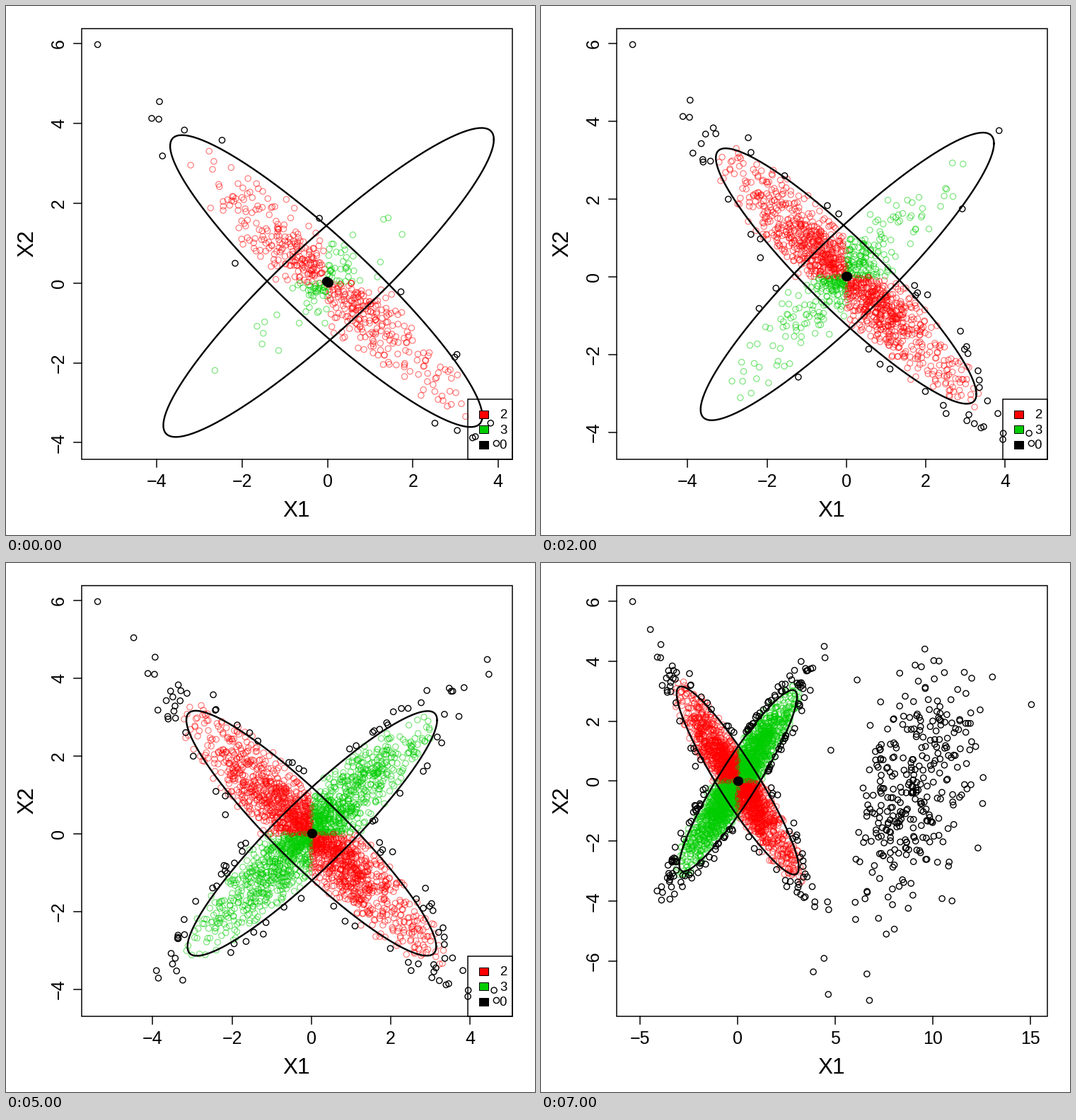
Animation of 748 by 748 pixels, one loop 8 s. Source, as a matplotlib script:

```python
import numpy as np
import matplotlib.pyplot as plt
from matplotlib.animation import FuncAnimation
from matplotlib.patches import Rectangle

SIZE, DPI = 748, 100
PX = 72 / DPI                      # points per pixel
LEFT, RIGHT, TOP, BOTTOM = 107, 716, 32, 641
RED, GREEN, BLACK = "#ff0000", "#00cd00", "#000000"
STEPS = 8
R = 0.925                          # correlation of both clusters

plt.rcParams["font.family"] = "Liberation Sans"
rng = np.random.default_rng(12)


def half_falling(t):
    return 3.125 + 0.535 * np.exp(-0.6 * t)


def half_rising(t):
    return 3.02 + 0.855 * (1 + np.cos(np.pi * min(t / 6.7, 1))) / 2


def mid_falling(t):
    fade = np.exp(-0.9 * t)
    return -0.03 * fade, 0.02 + 0.03 * fade


def mid_rising(t):
    return 0.025, 0.015


def count_falling(t):
    return int(np.interp(t, [0, 3, 7], [520, 1500, 1560]))


def count_rising(t):
    return min(28 + 45 * t * t, 1850)


def normal_pairs(n, sigma, r):
    z = rng.normal(size=(n, 2))
    return z, sigma * np.c_[z[:, 0], r * z[:, 0] + np.sqrt(1 - r * r) * z[:, 1]]


def cluster(n, r, limit, sigma=1.4):
    """Correlated normal sample cut off at an ellipse of half width limit."""
    z, p = normal_pairs(2 * n, sigma, r)
    return p[np.hypot(*z.T) < limit / sigma][:n]


def ellipse(theta, half, r, center=(0, 0)):
    phi = np.arccos(r)
    return np.c_[center[0] + half * np.cos(theta),
                 center[1] + half * np.cos(theta - phi)]


def ring(n, half, r):
    """Outliers around an ellipse, spread wider towards its tips."""
    theta = rng.uniform(0, 2 * np.pi, 8 * n)
    tip = np.cos(theta - np.arccos(r) / 2) ** 4
    reach = 1.04 + rng.exponential(0.04 + 0.07 * tip)
    p = ellipse(theta, half, r) * reach[:, None]
    x, y = p.T
    keep = (np.abs(x + np.sign(r) * y) > 1.8) & (x > -4.6) & (x < 3.95)
    return p[keep & (y > -4) & (y < 5.1)][:n]


def far_cloud(n):
    p = normal_pairs(2 * n, 1, 0.58)[1] * (1.75, 2.05) + (9, -0.2)
    x, y = p.T
    return p[(x > 5.9) & (x < 12.8) & (np.abs(y) < 5.1)][:n]


# Extreme points that set the axis limits as they arrive
extremes = {
    0: [(-5.39, 5.98), (-3.94, 4.55), (3.4, -3.88), (3.96, -4.02)],
    1: [(4.61, -4.02), (3.95, -4.18)],
    2: [(4.67, -4.28)],
    3: [(-4.48, 5.05), (4.48, 4.11)],
    5: [(4.44, 4.49)],
    6: [(13.07, 3.47), (4.43, -5.9), (6.63, -6.42), (4.65, -7.1)],
    7: [(15.07, 2.55), (6.76, -7.3), (6.13, 3.37), (4.78, 1.03), (3.88, -6.35)],
}


def arrivals(t):
    """Outliers that join at step t."""
    parts = [np.reshape(extremes.get(t, []), (-1, 2)),
             ring(14 if t < 4 else 2, half_falling(t), -R),
             ring(min(int(1.1 * t * t), 38), half_rising(t), R)]
    if t >= 6:
        parts.append(far_cloud(86 if t == 6 else 230))
    return np.vstack(parts)


joins = [arrivals(t) for t in range(STEPS)]
falling = cluster(count_falling(STEPS), -R, 3.4)
rising = cluster(count_rising(STEPS), R, 3.2)
rank_falling = rng.random(len(falling))
rank_rising = rng.random(len(rising))

fig = plt.figure(figsize=(SIZE / DPI, SIZE / DPI), dpi=DPI, facecolor="white")
ax = fig.add_axes([0, 0, 1, 1])


def line(xs, ys, width=1.5):
    ax.plot(xs, ys, color=BLACK, lw=width * PX, zorder=4)


def label(x, y, text, size, rotation=0):
    ax.text(x, y, text, fontsize=size * PX, ha="center", va="baseline",
            rotation=rotation, rotation_mode="anchor", zorder=5)


def circles(p, color, alpha, width, z):
    ax.scatter(p[:, 0], p[:, 1], s=(8.2 * PX) ** 2, facecolors="none",
               edgecolors=color, alpha=alpha, linewidths=width * PX, zorder=z)


def box(x, y, w, h, face, width):
    ax.add_patch(Rectangle((x, y), w, h, facecolor=face, edgecolor=BLACK,
                           lw=width * PX, zorder=4))


def ticks(lo, hi, step):
    return range(int(np.ceil(lo / step)) * step, int(hi) + 1, step)


def number(v):
    return str(v).replace("-", "\u2212")


def draw_legend():
    box(653.5, 555.5, RIGHT - 653.5, BOTTOM - 555.5, "none", 1.5)
    for i, (color, text) in enumerate([(RED, "2"), (GREEN, "3"), (BLACK, "0")]):
        y = 577 + 21.5 * i
        box(669.5, y - 5.5, 12.5, 11, color, 1)
        label(703, y + 6.3, text, 18.7)


def draw(t):
    ax.clear()
    ax.set_xlim(0, SIZE)
    ax.set_ylim(SIZE, 0)
    ax.set_autoscale_on(False)
    ax.axis("off")

    outliers = np.vstack(joins[:t + 1])
    lo, hi = outliers.min(axis=0), outliers.max(axis=0)
    pad = 0.04 * (hi - lo)
    lo, hi = lo - pad, hi + pad
    scale = (RIGHT - LEFT) / (hi - lo)

    def place(p):
        p = np.atleast_2d(p)
        return np.c_[LEFT + (p[:, 0] - lo[0]) * scale[0],
                     BOTTOM - (p[:, 1] - lo[1]) * scale[1]]

    # Colour by quadrant, with both colours mixed in drawing order
    a, b = count_falling(t), count_rising(t)
    order = np.argsort(np.r_[rank_falling[:a], rank_rising[:b]])
    inner = np.vstack([falling[:a], rising[:b]])[order]
    colors = np.where(inner.prod(axis=1) < 0, RED, GREEN)
    circles(place(inner), colors, 0.5, 1.25, 1)
    circles(place(outliers), BLACK, 1, 1.4, 3)

    theta = np.linspace(0, 2 * np.pi, 120)
    for half, r, mid in [(half_falling(t), -R, mid_falling(t)),
                         (half_rising(t), R, mid_rising(t))]:
        line(*place(ellipse(theta, half, r, mid)).T, 2.4)
        ax.scatter(*place(mid).T, s=(13.2 * PX) ** 2, color=BLACK,
                   linewidths=0, zorder=5)

    box(LEFT, TOP, RIGHT - LEFT, BOTTOM - TOP, "none", 1.5)
    for v in ticks(lo[0], hi[0], 5 if hi[0] > 10 else 2):
        x = place((v, 0))[0, 0]
        line([x, x], [BOTTOM, BOTTOM + 10.5])
        label(x, 680, number(v), 25)
    for v in ticks(lo[1], hi[1], 2):
        y = place((0, v))[0, 1]
        line([LEFT - 10.5, LEFT], [y, y])
        label(82, y, number(v), 25, rotation=90)
    label(410.5, 722, "X1", 31.5)
    label(38, 336, "X2", 31.5, rotation=90)
    if t < STEPS - 1:
        draw_legend()
    return ax.get_children()


anim = FuncAnimation(fig, draw, frames=STEPS, interval=1000,
                     repeat=True, repeat_delay=0, blit=False)
plt.show()
```
